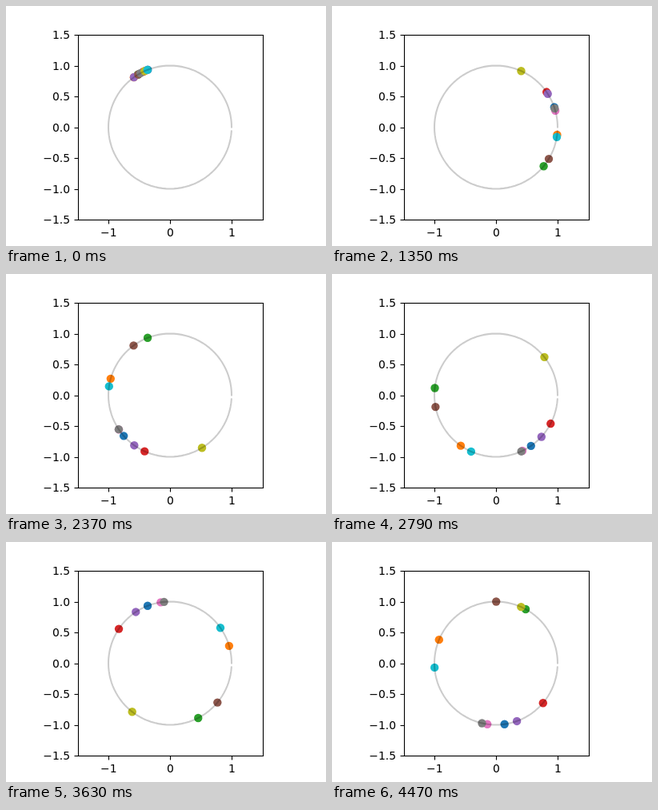
Write an HTML page with a canvas that moves like this. It is 400 by 300 pixels and loops after 4.5 s.

```html
<!DOCTYPE html>
<html lang="en">
<head>
<meta charset="utf-8">
<title>Dots on a circle</title>
<style>
  html, body { margin: 0; width: 100%; height: 100%; overflow: hidden; background: #fff; }
  canvas { display: block; }
</style>
</head>
<body>
<canvas id="stage" width="400" height="300"></canvas>
<script>
const ctx = document.getElementById('stage').getContext('2d');
const TAU = 2 * Math.PI;
const STEP_MS = 30, STEPS = 150;
const CX = 205, CY = 151.5, R = 77;
const FONT = '13.89px "DejaVu Sans", sans-serif';

// colour, starting angle and turn per step, both in degrees
const dots = [
  ['#1f77b4', 111.1, 5.952],
  ['#ff7f0e', 125.9, 5.045],
  ['#2ca02c', 121.45, 4.428],
  ['#d62728', 115.7, 6.202],
  ['#9467bd', 125.8, 5.933],
  ['#8c564b', 121.0, 4.623],
  ['#e377c2', 113.25, 5.83],
  ['#7f7f7f', 118.6, 5.76],
  ['#bcbd22', 114.3, 6.924],
  ['#17becf', 111.5, 5.319]
];

const snap = v => Math.floor(v + 0.5) + 0.5;
const label = (value, digits) => value.toFixed(digits).replace('-', '\u2212');

function line(x1, y1, x2, y2) {
  ctx.beginPath();
  ctx.moveTo(x1, y1);
  ctx.lineTo(x2, y2);
  ctx.stroke();
}

function drawDots(step) {
  for (const [color, start, turn] of dots) {
    const a = (start + turn * step) * Math.PI / 180;
    ctx.fillStyle = color;
    ctx.beginPath();
    ctx.arc(CX + R * Math.cos(a), CY - R * Math.sin(a), 5.2, 0, TAU);
    ctx.fill();
  }
}

// 100 points, left open just before the full turn
function drawTrack() {
  ctx.strokeStyle = 'rgba(0,0,0,0.2)';
  ctx.lineWidth = 2.08;
  ctx.lineCap = 'square';
  ctx.lineJoin = 'round';
  ctx.beginPath();
  for (let i = 0; i < 100; i++) {
    const a = i / 100 * TAU;
    ctx.lineTo(CX + R * Math.cos(a), CY - R * Math.sin(a));
  }
  ctx.stroke();
}

function drawAxes() {
  const half = 1.5 * R;
  const left = snap(CX - half), right = snap(CX + half);
  const top = snap(CY - half), bottom = snap(CY + half);
  ctx.strokeStyle = ctx.fillStyle = '#000';
  ctx.lineWidth = 1.11;
  ctx.lineCap = 'butt';
  ctx.lineJoin = 'miter';
  ctx.strokeRect(left, top, right - left, bottom - top);
  ctx.font = FONT;
  ctx.textBaseline = 'alphabetic';

  ctx.textAlign = 'right';
  for (let v = -1.5; v <= 1.5; v += 0.5) {
    const y = CY - v * R;
    line(left - 5, snap(y), left, snap(y));
    ctx.fillText(label(v, 1), 80, Math.round(y + 5));
  }
  ctx.textAlign = 'center';
  for (let v = -1; v <= 1; v++) {
    const x = CX + v * R;
    line(snap(x), bottom, snap(x), bottom + 5);
    ctx.fillText(label(v, 0), x + 0.3, 288);
  }
}

function draw() {
  const step = Math.floor(performance.now() / STEP_MS) % STEPS;
  ctx.fillStyle = '#fff';
  ctx.fillRect(0, 0, 400, 300);
  drawDots(step);
  drawTrack();
  drawAxes();
  requestAnimationFrame(draw);
}
draw();
</script>
</body>
</html>
```
